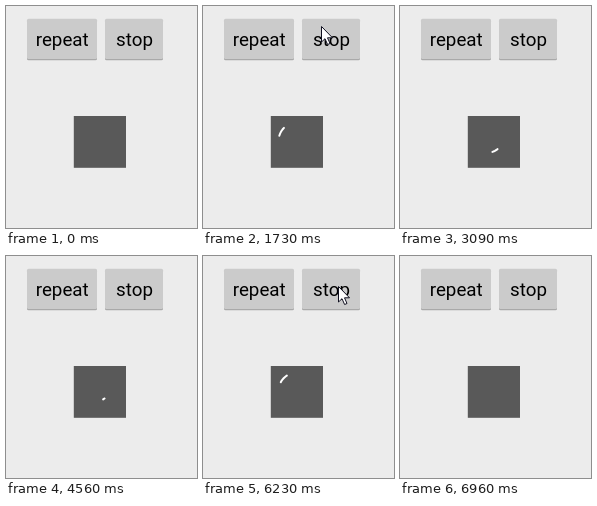
Recreate the animation shown at these times as an HTML page. Size 191 px wide and 222 px high, loop 8.95 s.

```html
<!DOCTYPE html>
<html lang="en">
<head>
<meta charset="utf-8">
<title>Spiral loader</title>
<style>
  html, body { margin: 0; width: 100%; height: 100%; overflow: hidden; background: #ececec; }
  svg { display: block; width: 191px; height: 222px; }
  text { font: 18.8px Roboto, sans-serif; text-anchor: middle; }
</style>
</head>
<body>
<svg viewBox="0 0 191 222">
  <rect width="191" height="222" fill="#ececec"/>
  <g fill="#a9a9a9">
    <rect x="21" y="14" width="70" height="40.2" rx="1.5"/>
    <rect x="99" y="14" width="58" height="40.2" rx="1.5"/>
  </g>
  <g fill="#cbcbcb">
    <rect x="21" y="12.7" width="70" height="40.3" rx="1.5"/>
    <rect x="99" y="12.7" width="58" height="40.3" rx="1.5"/>
  </g>
  <text x="56.2" y="40">repeat</text>
  <text x="128.5" y="40">stop</text>
  <rect x="67.8" y="110" width="52.2" height="51.8" fill="#595959"/>
  <path id="dash" fill="none" stroke="#fff" stroke-width="2" stroke-linecap="round"/>
  <path id="cursor" d="M.5 .5V16L4 12.7L6.6 18.5L9 17.5L6.5 11.8H11.5Z" fill="#fff" stroke="#101020"/>
</svg>
<script>
const LOOP = 8950;
const dash = document.getElementById('dash');
const cursor = document.getElementById('cursor');

const clamp = v => Math.min(1, Math.max(0, v));
const mix = (a, b, k) => a + (b - a) * k;
const progress = (t, start, end) => clamp((t - start) / (end - start));

// The pointer comes in, rests on a button, then leaves; bend lifts the way in.
const visits = [
  { enter: 650, arrive: 1180, leave: 1580, gone: 1940,
    from: [182, 0], rest: [66, 26], exit: [191, 12], bend: 0 },
  { enter: 5110, arrive: 6230, leave: 6400, gone: 6900,
    from: [191, 59], rest: [135, 30], exit: [192, 48], bend: 28 }
];

function cursorAt(t) {
  const visit = visits.find(v => t >= v.enter && t < v.gone);
  if (!visit) return null;
  const { enter, arrive, leave, gone, from, rest, exit, bend } = visit;
  const inward = progress(t, enter, arrive);
  const outward = progress(t, leave, gone);
  const [x, y] = [0, 1].map(i => mix(mix(from[i], rest[i], inward), exit[i], outward));
  return [x, y - bend * Math.sin(Math.PI * inward)].map(Math.round);
}

// The spiral opens from a small radius to a full circle, clockwise.
const SPIN = { first: 1562, period: 1495, length: 912, count: 4 };
const START = 58, SWEEP = 364;

function spiralPoint(deg) {
  const k = clamp((deg - START) / 125);
  const r = 9 + 9.2 * k * k * (3 - 2 * k);
  const a = deg * Math.PI / 180;
  return (93.8 + r * Math.cos(a)).toFixed(2) + ' ' + (134.8 + r * Math.sin(a)).toFixed(2);
}

function dashAt(t) {
  const turn = Math.floor((t - SPIN.first) / SPIN.period);
  const p = (t - SPIN.first - turn * SPIN.period) / SPIN.length;
  if (turn < 0 || turn >= SPIN.count || p >= 1) return '';
  const head = START + SWEEP * (1 - (1 - p) ** 3);
  const tail = Math.max(START, head - 32 * Math.sqrt(1 - p));
  const points = Array.from({ length: 13 }, (_, i) => spiralPoint(mix(tail, head, i / 12)));
  return 'M' + points.join('L');
}

function draw(t) {
  dash.setAttribute('d', dashAt(t));
  const tip = cursorAt(t);
  cursor.style.display = tip ? '' : 'none';
  if (tip) cursor.setAttribute('transform', `translate(${tip})`);
}

const began = performance.now();
function tick() {
  draw((performance.now() - began) % LOOP);
  requestAnimationFrame(tick);
}
tick();
</script>
</body>
</html>
```
